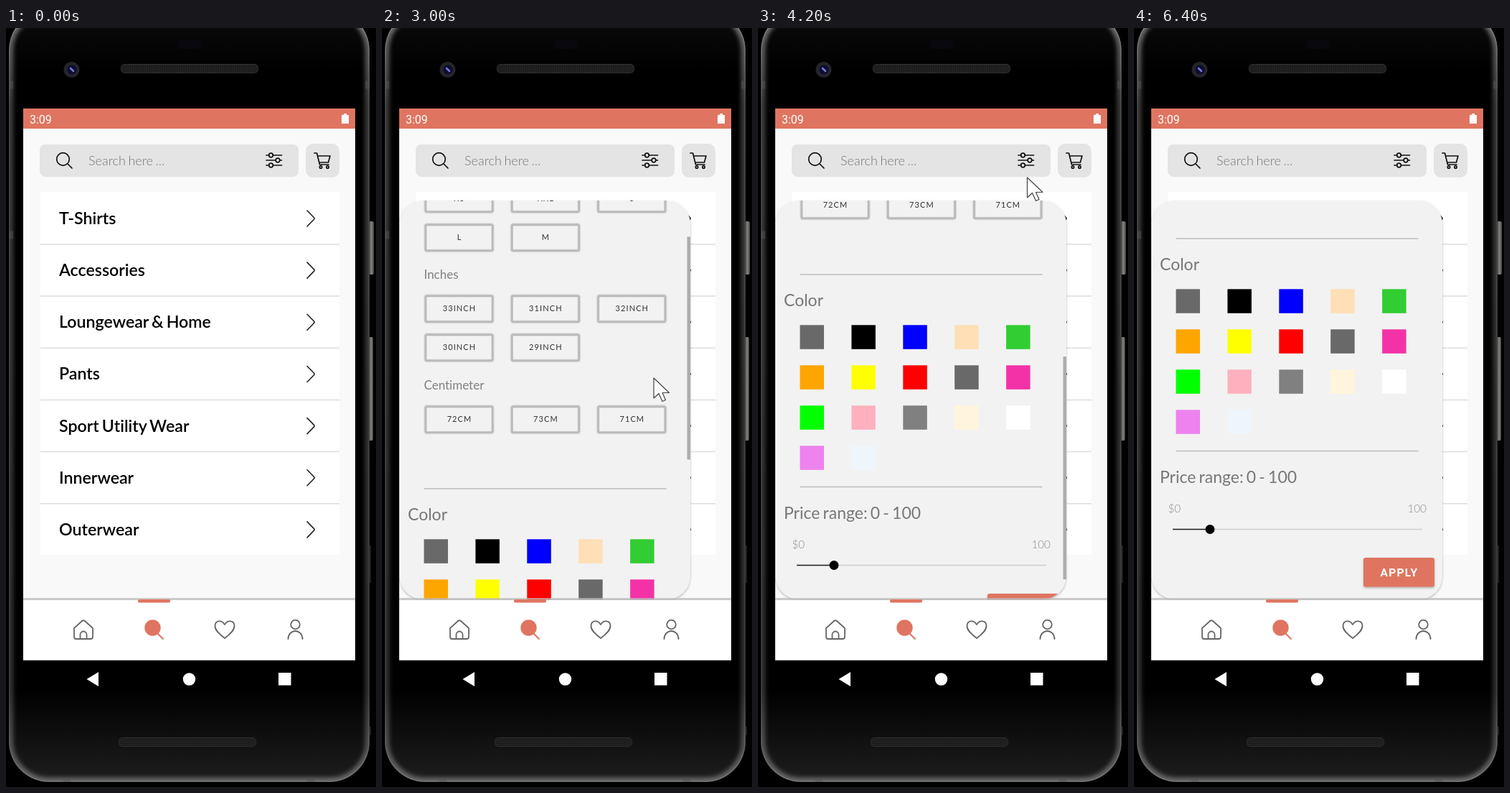
Write an HTML page that moves like this. It is 516x1056 px and loops after 6600 ms.

```html
<!DOCTYPE html>
<html lang="en">
<head>
<meta charset="utf-8">
<title>Shop filter</title>
<style>
  html, body { margin: 0; width: 100%; height: 100%; overflow: hidden; background: #000; }
  svg { display: block; }
  text { font-family: Lato, sans-serif; font-variant-ligatures: none; word-spacing: -.075em; }
  .line { fill: none; stroke-linecap: round; stroke-linejoin: round; }
  .title { font-size: 23px; fill: #777; }
  .label { font-size: 17px; fill: #808080; }
  .chip { font-size: 11px; letter-spacing: 1.1px; fill: #333; text-anchor: middle; }
  .range { font-size: 15.3px; font-weight: 300; fill: #8c8c8c; }
  .roboto { font-family: Roboto, sans-serif; fill: #fff; }
</style>
</head>
<body>
<svg width="516" height="1056" viewBox="0 0 516 1056">
  <defs>
    <linearGradient id="rim" x2="0" y2="1">
      <stop offset="0" stop-color="#888"/>
      <stop offset=".12" stop-color="#4a4a4a"/>
      <stop offset=".88" stop-color="#3c3c3c"/>
      <stop offset="1" stop-color="#777"/>
    </linearGradient>
    <linearGradient id="glass" x2="0" y2="1">
      <stop offset="0" stop-color="#0c0c0c"/>
      <stop offset=".08" stop-color="#000"/>
      <stop offset=".88" stop-color="#000"/>
      <stop offset="1" stop-color="#1e1e1e"/>
    </linearGradient>
    <linearGradient id="key">
      <stop offset="0" stop-color="#333"/>
      <stop offset=".6" stop-color="#85837d"/>
      <stop offset="1" stop-color="#444441"/>
    </linearGradient>
    <pattern id="mesh" width="3" height="3" patternUnits="userSpaceOnUse">
      <rect width="3" height="3" fill="#1b1b1b"/><rect width="1.5" height="1.5" fill="#2a2a2a"/>
    </pattern>
    <filter id="shadow" x="-10%" y="-10%" width="120%" height="120%">
      <feDropShadow dx="0" dy="1.5" stdDeviation="1.5" flood-opacity=".3"/>
    </filter>
    <filter id="soft"><feGaussianBlur stdDeviation="3"/></filter>
    <clipPath id="body"><rect x="4" y="-25" width="503" height="1074" rx="56"/></clipPath>
    <clipPath id="screen"><rect x="24" y="112" width="463" height="767.500"/></clipPath>
    <clipPath id="sheet"><rect x="24" y="240" width="406" height="555" rx="33"/></clipPath>
  </defs>

  <!-- phone body -->
  <g fill="url(#key)">
    <rect x="505" y="269" width="8" height="74" rx="2"/>
    <rect x="505" y="430" width="7" height="144" rx="2"/>
    <rect x="506" y="720" width="3" height="52" fill="#222"/>
    <rect x="506" y="972" width="3" height="12" fill="#222"/>
  </g>
  <g clip-path="url(#body)" fill="none" stroke="url(#rim)">
    <rect x="4" y="-25" width="503" height="1074" fill="url(#glass)" stroke="none"/>
    <rect x="6" y="-23" width="499" height="1070" rx="54" stroke-width="7" filter="url(#soft)"/>
    <rect x="5" y="-24" width="501" height="1072" rx="55" stroke-width="1.500"/>
  </g>
  <path d="M4 79h6M4 288h6M501 79h6M85 1045v4M425 1045v4" stroke="#555" stroke-width="11" opacity=".5"/>
  <rect x="238" y="17" width="35" height="12" rx="6" fill="#08080e"/>
  <g fill="url(#mesh)" stroke="#303030">
    <rect x="160.500" y="50.500" width="191" height="12" rx="5"/>
    <rect x="157.500" y="987.500" width="191" height="12" rx="5"/>
  </g>
  <circle cx="91.500" cy="58" r="11" fill="#24242a"/>
  <circle cx="92" cy="58" r="6.500" fill="#0d0d30"/>
  <path d="M90 56l4 4" stroke="#7a7ad8" stroke-width="2.500" class="line"/>

  <g clip-path="url(#screen)">
    <rect x="24" y="112" width="463" height="768" fill="#f9f9f9"/>
    <rect x="24" y="112" width="463" height="28" fill="#df7560"/>
    <text x="33" y="132.500" font-size="16" class="roboto">3:09</text>
    <path d="M468 121h3v-2h4v2h3v12h-10z" fill="#fff"/>

    <!-- search bar -->
    <rect x="47" y="162" width="361" height="45" rx="8" fill="#e4e4e4"/>
    <rect x="418" y="161" width="47" height="47" rx="10" fill="#e4e4e4"/>
    <text x="115" y="190.500" font-size="18" font-weight="300" fill="#777">Search here ...</text>
    <g class="line" stroke="#111" stroke-width="1.700">
      <circle cx="79.500" cy="182.500" r="8.800"/><path d="M86 189l6 6"/>
      <path d="M363 177h3.500M372.500 177h12M363 184h13M382 184h2.500M363 191h3.500M372.500 191h12"/>
      <circle cx="369.500" cy="177" r="2.800"/><circle cx="379" cy="184" r="2.800"/><circle cx="369.500" cy="191" r="2.800"/>
      <path d="M430 174h3.500l4 16h12.500M434.500 178h17.500l-2.500 9h-12.500"/>
      <circle cx="439" cy="193.500" r="1.700"/><circle cx="448.500" cy="193.500" r="1.700"/>
    </g>

    <rect x="48" y="228" width="417" height="505" fill="#fff"/>
    <g id="list"></g>

    <g id="panel">
      <rect x="24.500" y="240" width="405.500" height="555" rx="33" fill="#f2f2f2" filter="url(#shadow)"/>
      <g clip-path="url(#sheet)"><g id="content"></g></g>
      <rect id="thumb" x="425.500" width="4.500" height="310" fill="#adadad"/>
    </g>

    <!-- tab bar -->
    <rect x="24" y="793" width="463" height="3" fill="#bbb" opacity=".75"/>
    <rect x="24" y="796" width="463" height="84" fill="#fff"/>
    <rect x="184" y="795" width="45" height="4.500" rx="2" fill="#df7560"/>
    <g class="line" stroke="#666" stroke-width="1.800">
      <path d="M95 835l11-10q2-1.500 4 0l11 10v12q0 3-3 3h-20q-3 0-3-3zM103.500 850v-6a4.500 4.500 0 0 1 9 0v6"/>
      <path d="M305 849C297 843 291.500 838 291.500 832C291.500 824 301 823 305 830C309 823 318.500 824 318.500 832C318.500 838 313 843 305 849z"/>
      <circle cx="403.500" cy="830" r="6.300"/><path d="M393.500 850a10 11 0 0 1 20 0"/>
    </g>
    <circle cx="204.500" cy="834.500" r="11.200" fill="#df7560"/>
    <path d="M211 842l8 8" class="line" stroke="#df7560" stroke-width="2"/>
  </g>

  <g fill="#fff">
    <path d="M112.500 906L129 896v20z"/>
    <circle cx="255.500" cy="906" r="8.700"/>
    <rect x="380" y="897" width="17.500" height="17.500"/>
  </g>
  <path id="cursor" d="M0 0V28L7 21.500L12 32.500L16.500 30.500L12 20.500H21.500z" fill="#fff" stroke="#444" stroke-width="1.200" stroke-linejoin="round"/>
</svg>

<script>
const LOOP = 6600, MAX_SCROLL = 438;
const $ = id => document.getElementById(id);

// Category list
const categories = ['T-Shirts', 'Accessories', 'Loungewear &amp; Home', 'Pants', 'Sport Utility Wear', 'Innerwear', 'Outerwear'];
$('list').innerHTML = categories.map((name, i) => {
  const y = 265 + i * 72.15;
  return `<text x="74" y="${y + 8}" font-size="23.200" font-weight="600">${name}</text>
    <path d="M420 ${y - 11}l9.300 9.500q1.500 1.500 0 3l-9.300 9.500" class="line" stroke="#222" stroke-width="1.600"/>
    ${i ? `<path d="M48 ${y - 36.2}h417" stroke="#ddd" stroke-width="1.500"/>` : ''}`;
}).join('');

// Filter sheet, laid out at scroll position zero
const text = (cls, x, y, s, more = '') => `<text class="${cls}" x="${x}" y="${y}" ${more}>${s}</text>`;
const rule = y => `<path d="M58.500 ${y}h338" stroke="#bcbcbc" stroke-width="1.500"/>`;
const chips = (y, names) => names.split(' ').map((name, i) => {
  const x = 59 + i % 3 * 120.4, top = y + Math.floor(i / 3) * 54;
  const box = (inset, colour, width) => `<rect x="${x + inset}" y="${top + inset}" width="${97 - 2 * inset}"
    height="${39.5 - 2 * inset}" rx="2" fill="none" stroke="${colour}" stroke-width="${width}"/>`;
  return box(1.5, '#d8d8d8', 4.5) + box(1.8, '#bababa', 2.6) + text('chip', x + 49, top + 22.5, name);
}).join('');
const colours = ('#696969 #000 #00f #ffdfb5 #32cd32 #ffa500 #ff0 #f00 #696969 #f432a8 ' +
  '#0f0 #ffb0be #808080 #fff5dc #fff #ee82ee #eef5fb').split(' ');
const swatches = colours.map((c, i) =>
  `<rect x="${58.5 + i % 5 * 71.9}" y="${801.3 + Math.floor(i / 5) * 56}" width="33.500" height="33.500" fill="${c}"/>`).join('');

$('content').innerHTML =
  text('title', 36, 283, 'Size') + chips(308, 'XS XXL S L M') +
  text('label', 58.5, 439, 'Inches') + chips(461, '33INCH 31INCH 32INCH 30INCH 29INCH') +
  text('label', 58.5, 593, 'Centimeter') + chips(615, '72CM 73CM 71CM') +
  rule(731) + text('title', 36, 775, 'Color') + swatches +
  rule(1026.5) + text('title', 36, 1071, 'Price range: 0 - 100') +
  text('range', 47.5, 1111.5, '$0') + text('range', 408, 1111.5, '100', 'text-anchor="end"') +
  `<path d="M54 1135.500h348" stroke="#ccc" stroke-width="1.700"/>
   <path d="M54 1135.500h52" stroke="#222" stroke-width="1.700"/>
   <circle cx="106" cy="1135.500" r="6.500"/>
   <rect x="320" y="1175" width="99" height="40.500" rx="3" fill="#df7560" filter="url(#shadow)"/>` +
  text('roboto', 343.5, 1201, 'APPLY', 'font-size="15.500" font-weight="600" letter-spacing="1.300"');

// Linear interpolation through [time, value] pairs
function track(t, keys) {
  const i = keys.findIndex(k => k[0] > t);
  if (i < 0) return keys[keys.length - 1][1];
  if (i === 0) return keys[0][1];
  const [t0, a] = keys[i - 1], [t1, b] = keys[i];
  return a + (b - a) * (t - t0) / (t1 - t0);
}
const slideKeys = [[1400, -406], [1500, -180], [1600, 0]];
const scrollKeys = [[2700, 0], [3000, 90], [3500, 261], [4200, 388], [4500, MAX_SCROLL]];
const thumbKeys = [[1500, 0], [1600, 1], [1900, 1], [2200, 0], [2700, 0], [2800, 1], [4700, 1], [5100, 0]];
const cursorX = [[2400, 374.5], [2700, 381], [3000, 379], [3500, 369], [4200, 375.5], [4600, 400], [5000, 413]];
const cursorY = [[2400, 188], [2700, 585], [3000, 487], [3500, 333.5], [4200, 208], [4600, 150], [5000, 248.5]];

function draw() {
  const t = Math.floor(performance.now() % LOOP / 100) * 100;
  const scroll = track(t, scrollKeys);
  $('panel').setAttribute('visibility', t > 1400 ? 'visible' : 'hidden');
  $('panel').setAttribute('transform', `translate(${track(t, slideKeys)})`);
  $('content').setAttribute('transform', `translate(0 ${-scroll})`);
  $('thumb').setAttribute('y', 240 + scroll * 0.5596);
  $('thumb').setAttribute('opacity', track(t, thumbKeys));
  $('cursor').setAttribute('visibility', t >= 1400 && t < 5400 ? 'visible' : 'hidden');
  $('cursor').setAttribute('transform', `translate(${track(t, cursorX)} ${track(t, cursorY)})`);
  requestAnimationFrame(draw);
}
draw();
</script>
</body>
</html>
```
